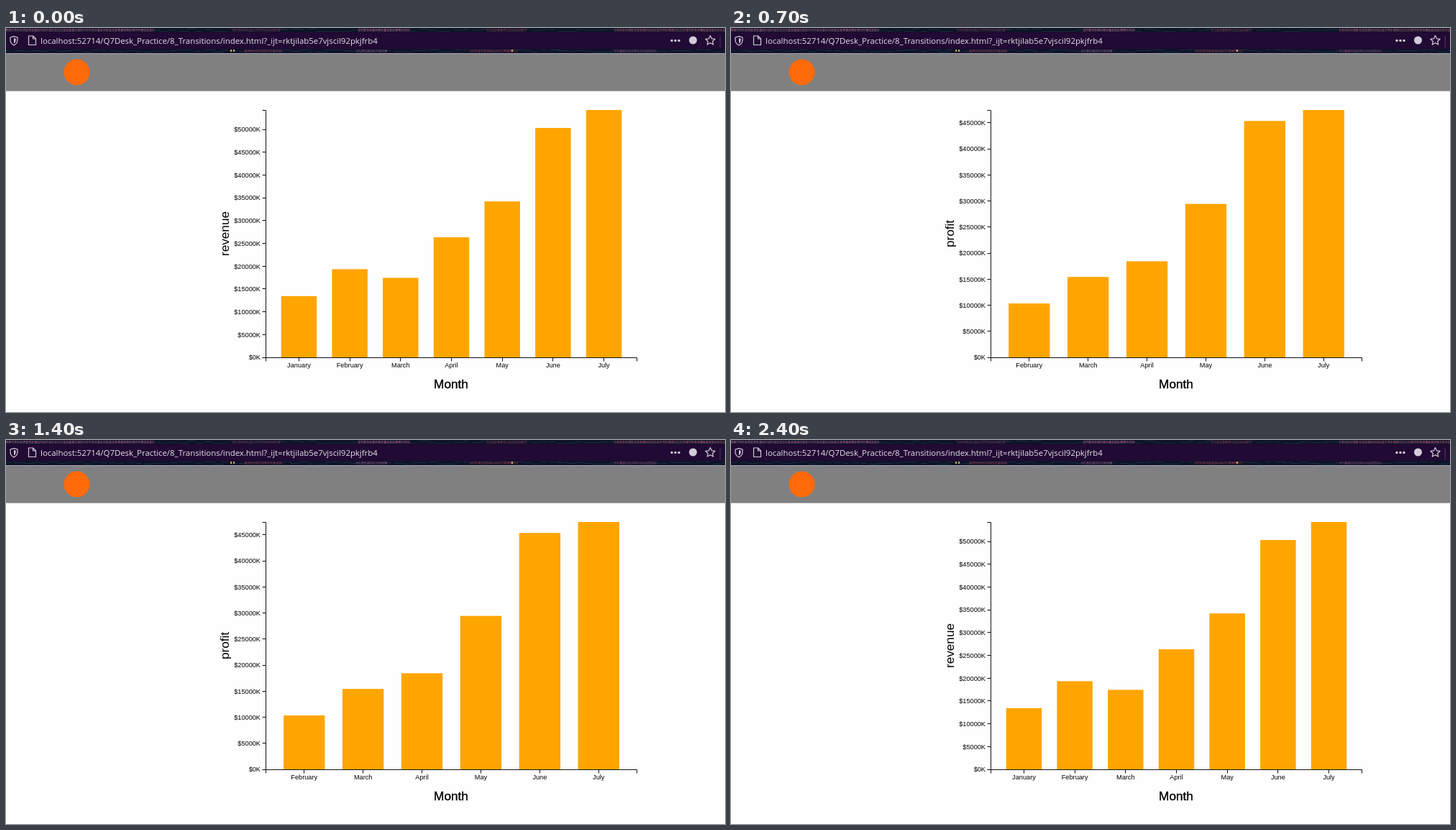
These frames come from a looping animation (1000x534 px, 2.5 s). An HTML page:

```html
<!DOCTYPE html>
<html lang="en">
<head>
<meta charset="utf-8">
<title>Monthly bar chart</title>
<style>
  html, body { margin: 0; width: 100%; height: 100%; overflow: hidden; background: #fefefe; }
  svg { display: block; width: 100%; height: 100%; }
  text { font-family: "Liberation Sans", Arial, sans-serif; fill: #000; }
  .url { font: 11.4px "Open Sans", "Noto Sans", sans-serif; fill: #e6e0ea; }
  .tick { font-size: 9.2px; }
  .title { font-size: 17.2px; text-anchor: middle; }
  .axis { fill: none; stroke: #111; }
  .icon { fill: none; stroke: #d3cbd9; stroke-width: 1.2; stroke-linejoin: round; }
</style>
</head>
<body>
<svg id="stage" viewBox="0 0 1000 534">
  <rect width="1000" height="36" fill="#0d1428"/>
  <g id="theme"></g>
  <rect y="6" width="1000" height="23" fill="#210a33"/>
  <rect x="992.500" y="11" width="1.500" height="17" fill="#35304c"/>
  <path class="icon" d="M11 11.6 16 13v4q0 4.500-5 7-5-2.500-5-7v-4z"/>
  <path d="M11 14v7.500q2.600-1.700 2.600-4.500v-2.300z" fill="#d3cbd9"/>
  <path class="icon" d="M31.500 11h6l4 4v8.500h-10zM37.500 11v4h4"/>
  <text class="url" x="48" y="22">localhost:52714/Q7Desk_Practice/8_Transitions/index.html?_ijt=rktjilab5e7vjscil92pkjfrb4</text>
  <g fill="#d3cbd9">
    <circle cx="926" cy="17.500" r="1.700"/><circle cx="931" cy="17.500" r="1.700"/><circle cx="936" cy="17.500" r="1.700"/>
    <circle cx="955.500" cy="17" r="5.500"/>
  </g>
  <path class="icon" d="M979.500 10.500l2 4.300 4.700.5-3.500 3.200 1 4.600-4.200-2.400-4.200 2.400 1-4.600-3.500-3.200 4.700-.5z"/>
  <rect y="35" width="1000" height="1" fill="#aaa5b5"/>
  <rect y="36" width="1000" height="51" fill="#808080"/>
  <rect y="87" width="1000" height="1" fill="#a4a4a4"/>
  <circle cx="98.500" cy="61.500" r="18" fill="#ff6a0a"/>
</svg>
<script>
const stage = document.getElementById('stage');
const theme = document.getElementById('theme');
const LEFT = 361.5, BASE = 458, WIDTH = 516, HEIGHT = 344, PADDING = 0.3;
const LOOP = 2500, PROFIT_START = 700, PROFIT_END = 1700;

const months = ['January', 'February', 'March', 'April', 'May', 'June', 'July'];
const revenue = [13432, 19342, 17443, 26342, 34213, 50321, 54273];
const profit = [10342, 15423, 18432, 29434, 45343, 47452];

function add(parent, tag, attrs, content = '') {
  const node = document.createElementNS('http://www.w3.org/2000/svg', tag);
  for (const key in attrs) node.setAttribute(key, attrs[key]);
  node.textContent = content;
  return parent.appendChild(node);
}

const snap = v => Math.floor(v) + 0.5;

function drawChart(name, labels, values) {
  const chart = add(stage, 'g', {});
  const max = Math.max(...values);
  const step = WIDTH / (labels.length + PADDING);
  const band = step * (1 - PADDING);
  const baseLine = snap(BASE);
  let axis = `M${LEFT - 5} 114.5H${LEFT}V${baseLine}H${LEFT - 5}M${LEFT} ${baseLine + 5}V${baseLine}H${LEFT + WIDTH}v5`;

  labels.forEach((label, i) => {
    const x = LEFT + step * (PADDING + i);
    const middle = x + band / 2;
    const height = HEIGHT * values[i] / max;
    add(chart, 'rect', { x, y: BASE - height, width: band, height, fill: '#ffa500' });
    add(chart, 'text', { class: 'tick', x: middle, y: 471.7, 'text-anchor': 'middle' }, label);
    axis += `M${snap(middle)} ${baseLine}v5`;
  });

  for (let value = 0; value <= max; value += 5000) {
    const y = BASE - HEIGHT * value / max;
    add(chart, 'text', { class: 'tick', x: 354, y: y + 3.3, 'text-anchor': 'end' }, `$${value}K`);
    axis += `M${LEFT - 5} ${snap(y)}h5`;
  }

  add(chart, 'path', { class: 'axis', d: axis });
  add(chart, 'text', { class: 'title', transform: 'translate(310 286) rotate(-90)' }, name);
  return chart;
}

// Small coloured marks in the strips above and below the address bar.
function drawTheme() {
  let seed = 7;
  const random = () => (seed = seed * 16807 % 2147483647) / 2147483647;
  const clusters = [
    [0, 206, 0, '#85486c'], [315, 382, 0, '#5b2a45'], [490, 562, 0, '#8f4a74'],
    [668, 724, 0, '#652a42'], [846, 1000, 0, '#85425f'],
    [332, 384, 29, '#74304a'], [487, 530, 29, '#75456c'],
    [645, 712, 29, '#6c2c44'], [846, 905, 29, '#64365a']
  ];
  for (let x = 0; x < 1000; x += 12) {
    for (const y of [1, 30]) {
      add(theme, 'rect', { x, y: y + Math.floor(random() * 4), width: 6 + random() * 10, height: 1, fill: '#1d2840' });
    }
  }
  for (const [start, end, top, fill] of clusters) {
    add(theme, 'rect', { x: start, y: top + 1, width: end - start, height: 4, fill, opacity: 0.3 });
    for (let x = start; x < end; x += 4) {
      add(theme, 'rect', {
        x, y: top + 1, width: 1 + random() * 2, height: 2 + random() * 2,
        fill, opacity: 0.3 + random() * 0.6
      });
    }
  }
  for (const x of [312, 316, 703]) add(theme, 'rect', { x, y: 30, width: 2, height: 3, fill: '#c5a568' });
}

drawTheme();
const revenueChart = drawChart('revenue', months, revenue);
const profitChart = drawChart('profit', months.slice(1), profit);
add(stage, 'text', { class: 'title', x: 619, y: 500.5, stroke: '#000', 'stroke-width': 0.35 }, 'Month');

function render(now) {
  const time = now % LOOP;
  const showProfit = time >= PROFIT_START && time < PROFIT_END;
  revenueChart.style.display = showProfit ? 'none' : '';
  profitChart.style.display = showProfit ? '' : 'none';
}

const startTime = performance.now();
function tick() {
  render(performance.now() - startTime);
  requestAnimationFrame(tick);
}
tick();
</script>
</body>
</html>
```
